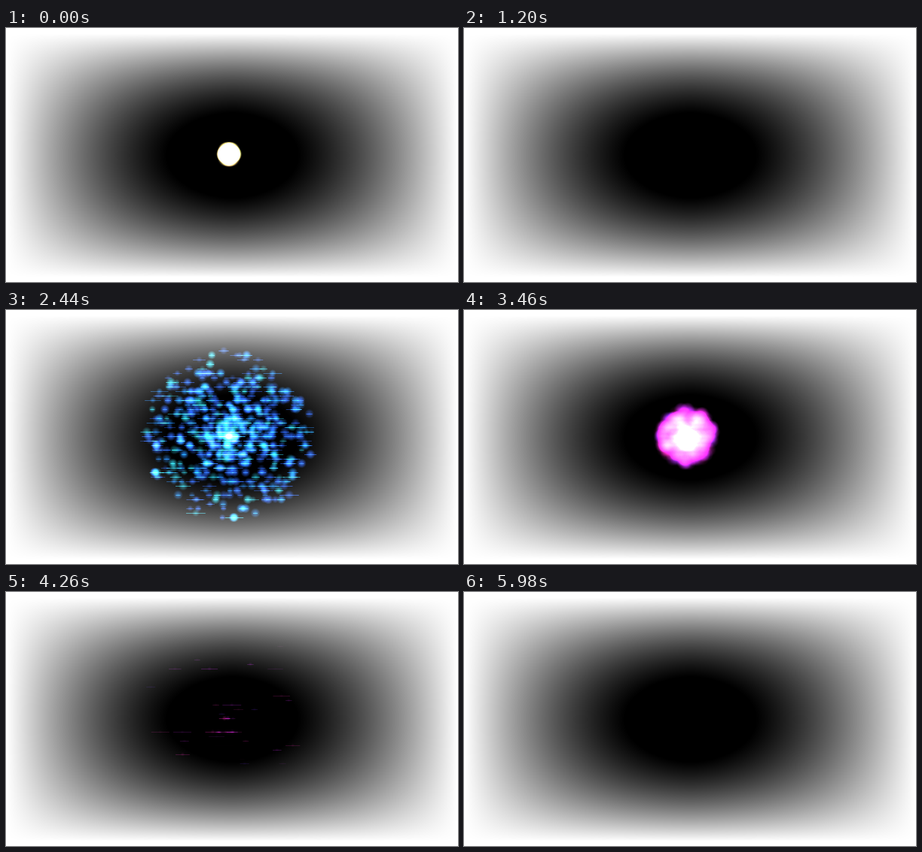
Write an HTML page with a canvas that moves like this. It is 600x338 px and loops after 6000 ms.

```html
<!DOCTYPE html>
<html lang="en">
<head>
<meta charset="utf-8">
<title>Bursts</title>
<style>
  html, body { margin: 0; width: 100%; height: 100%; overflow: hidden; background: #fff; }
  canvas { display: block; width: 600px; height: 338px; }
</style>
</head>
<body>
<canvas id="stage" width="600" height="338"></canvas>
<script>
const W = 600, H = 338, LOOP = 6000, COUNT = 560;
const GAP = 5000 / 3, FIRST_AGE = 20;
const CX = 296, CY = 168, ROW = 6;
const ctx = document.getElementById('stage').getContext('2d');

// One burst per palette, started GAP ms apart
const palettes = [
  [[255, 205, 110], [150, 255, 90], [255, 120, 120]],
  [[45, 105, 255], [35, 140, 255], [45, 200, 225]],
  [[215, 40, 255], [255, 40, 190], [110, 45, 255]],
  [[255, 100, 55], [255, 125, 50], [255, 60, 60]]
];

function layer(w, h) {
  const c = document.createElement('canvas');
  c.width = w;
  c.height = h;
  return c;
}

function seeded(seed) {
  return () => {
    seed = (Math.imul(seed, 1664525) + 1013904223) >>> 0;
    return seed / 4294967296;
  };
}

function makeVignette() {
  const c = layer(W, H), g = c.getContext('2d');
  const img = g.createImageData(W, H);
  for (let y = 0, i = 0; y < H; y++) {
    const v = Math.max(0, 1 - ((y - 169) / 162) ** 2);
    for (let x = 0; x < W; x++, i += 4) {
      const u = Math.max(0, 1 - Math.abs((x - 300) / 299) ** 1.7);
      const shade = 255 * (1 - Math.min(1, 1.14 * u * v));
      img.data[i] = img.data[i + 1] = img.data[i + 2] = shade;
      img.data[i + 3] = 255;
    }
  }
  g.putImageData(img, 0, 0);
  return c;
}

function makeGlow(rgb) {
  const c = layer(48, 48), g = c.getContext('2d');
  const fill = g.createRadialGradient(24, 24, 0, 24, 24, 24);
  fill.addColorStop(0, `rgba(${rgb},1)`);
  fill.addColorStop(0.45, `rgba(${rgb},0.6)`);
  fill.addColorStop(1, `rgba(${rgb},0)`);
  g.fillStyle = fill;
  g.fillRect(0, 0, 48, 48);
  return c;
}

function makeBurst(tints, index) {
  const rnd = seeded(971 + index * 7919);
  const sparks = Array.from({ length: COUNT }, () => {
    const angle = rnd() * Math.PI * 2, reach = rnd() ** 0.85;
    const pick = rnd();
    return {
      dx: Math.cos(angle) * reach,
      dy: Math.sin(angle) * reach,
      tint: pick < 0.55 ? 0 : pick < 0.82 ? 1 : 2,
      life: 860 + 120 * rnd() ** 2 - 30 * reach,
      streak: 6 + 20 * rnd() ** 2
    };
  });
  return {
    start: index * GAP,
    sparks,
    glows: tints.map(makeGlow),
    inks: tints.map(t => `rgb(${t})`)
  };
}

const vignette = makeVignette();
const bursts = palettes.map(makeBurst);

function drawBurst(burst, age) {
  const spread = 140 * (1 - Math.exp(-age / 500));
  const size = 6 + 6 * Math.exp(-age / 300);
  const power = Math.min(0.9, 0.3 + 0.6 * age / 800);
  const snap = Math.min(1, 0.4 + age / 500);
  const streaks = Math.max(0, Math.min(1, (age - 300) / 300));

  for (const s of burst.sparks) {
    const fade = Math.min(1, (s.life - age) / 90);
    if (fade <= 0) continue;
    const x = CX + s.dx * spread;
    const offset = s.dy * spread;
    const row = Math.round(offset / ROW);
    const y = CY + offset + (row * ROW - offset) * snap;
    const r = size * (0.35 + 0.65 * fade);

    // Alternate rows are dimmer, giving the horizontal bands
    ctx.globalAlpha = power * fade * (row % 2 ? 0.6 : 1);
    ctx.drawImage(burst.glows[s.tint], x - r, y - r, 2 * r, 2 * r);
    if (streaks) {
      ctx.globalAlpha = 0.55 * streaks * Math.sqrt(fade);
      ctx.fillStyle = burst.inks[s.tint];
      ctx.fillRect(x - s.streak / 2, Math.round(y), s.streak, 1);
    }
  }
}

function draw(time) {
  ctx.globalAlpha = 1;
  ctx.globalCompositeOperation = 'source-over';
  ctx.drawImage(vignette, 0, 0);
  ctx.globalCompositeOperation = 'lighter';
  for (const burst of bursts) {
    const age = time - burst.start + FIRST_AGE;
    if (age >= FIRST_AGE && age < 1000) drawBurst(burst, age);
  }
}

const begin = performance.now();
function tick() {
  draw((performance.now() - begin) % LOOP);
  requestAnimationFrame(tick);
}
tick();
</script>
</body>
</html>
```
